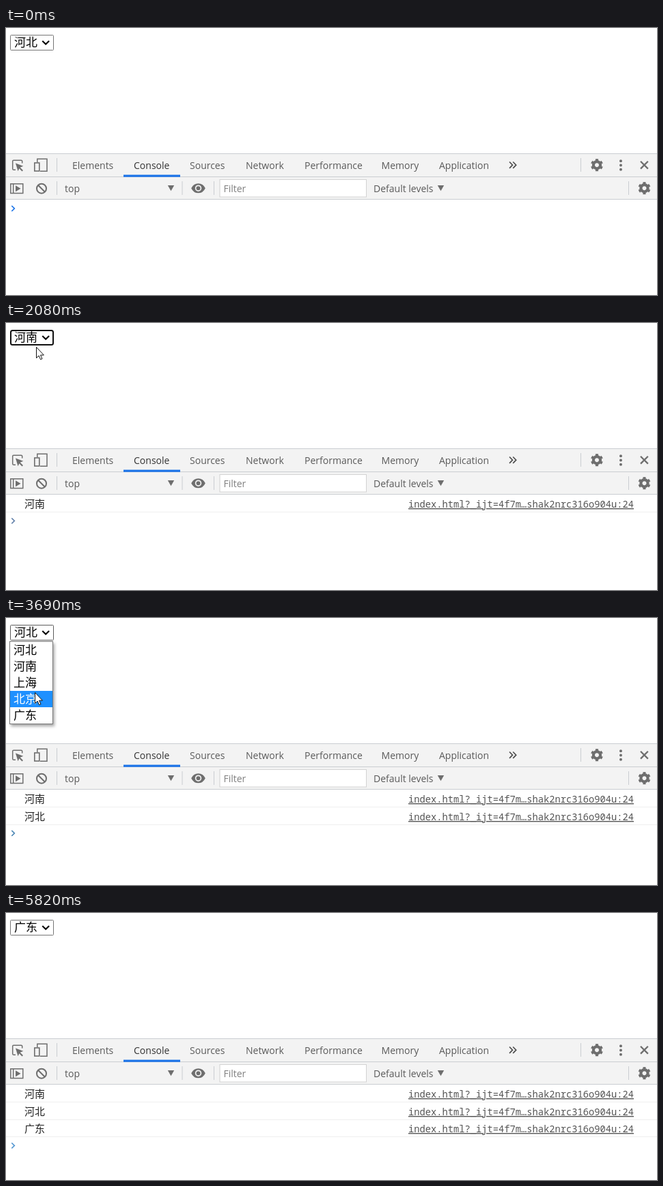
Recreate the animation shown at these times as an HTML page. Size 953 px wide and 392 px high, loop 5900 ms.

```html
<!DOCTYPE html>
<html lang="en">
<head>
<meta charset="utf-8">
<title>Select change demo</title>
<style>
  html, body { margin: 0; width: 100%; height: 100%; overflow: hidden; background: #fff; }
  svg { display: block; }
  text { white-space: pre; }
  .ui { font: 14px "Open Sans", "Noto Sans", sans-serif; fill: #5a5a5a; }
  .cjk { font: 17px "Noto Sans CJK SC", "Noto Sans CJK", sans-serif; fill: #000; }
  .log { font-size: 15px; fill: #222; }
  .link { font: 13.75px "Noto Sans Mono", "DejaVu Sans Mono", monospace; fill: #545454;
          text-anchor: end; text-decoration: underline; }
  .icon { fill: none; stroke: #6e6e6e; stroke-width: 2; }
  .solid { fill: #6e6e6e; stroke: none; }
  .rule { fill: none; stroke: #cacdd1; }
  .popup { filter: drop-shadow(2px 3px 2px rgba(0, 0, 0, .35)); }
</style>
</head>
<body>
<svg width="953" height="392" viewBox="0 0 953 392">
  <defs>
    <g id="gear" class="icon">
      <circle r="5.1" stroke-width="4.2"/>
      <circle r="7.8" stroke-width="2.6" pathLength="12" stroke-dasharray="1 1" transform="rotate(15)"/>
    </g>
    <path id="down" class="solid" d="M-4.7-4H4.7L0 4.2Z"/>
  </defs>

  <!-- Page: select box -->
  <rect id="box" fill="#fff"/>
  <text id="value" class="cjk" x="12" y="27.3"></text>
  <path d="M53.3 19l4.9 4.8 4.9-4.8" fill="none" stroke="#000" stroke-width="2.1"/>

  <!-- Developer tools: tab bar and console bar -->
  <rect y="184" width="953" height="68" fill="#f3f3f3"/>
  <path class="rule" d="M0 184.5H953M0 218.5H953M0 251.5H953M74.5 191v20M841.5 191v20M74.5 225v20M258 225v20M304.5 225v20M911.5 225v20"/>
  <rect x="172" y="215.5" width="83" height="3.2" fill="#1a73e8"/>
  <g id="tabs" class="ui"></g>

  <g class="icon">
    <path stroke-width="1.5" d="M14 208.2H11Q9.7 208.2 9.7 206.8V195.6Q9.7 194.2 11 194.2H22.2Q23.7 194.2 23.7 195.6V198.5"/>
    <path class="solid" d="M14 198.5l11.3 4.3-4.6 2 4.3 4.3-1.5 1.4-4.2-4.3-1.7 4.1z"/>
    <path stroke-width="1.5" d="M45.8 197V192.2H60V210.2H50"/>
    <rect x="41.8" y="198" width="7" height="12" stroke-width="1.6"/>
    <path stroke-width="1.7" d="M737 196.5l4.5 4.7-4.5 4.7M742.2 196.5l4.5 4.7-4.5 4.7" stroke="#505050"/>
    <path stroke-width="2.3" d="M929 195.8l10.8 10.8M939.8 195.8L929 206.6"/>
    <rect x="6.8" y="228.8" width="18" height="13.8" stroke-width="1.5"/>
    <path stroke-width="1.5" d="M10.7 229v13.5"/>
    <path class="solid" d="M14 231.2l7.5 4.5-7.5 4.5z"/>
    <circle cx="52" cy="235.7" r="7"/>
    <path d="M47 230.7l10 10"/>
  </g>
  <path class="solid" d="M271.2 235.2Q274.5 228.2 281.5 228.2T291.8 235.2Q288.5 242.3 281.5 242.3T271.2 235.2Z"/>
  <circle cx="281.5" cy="235.2" r="3.9" fill="#6e6e6e" stroke="#f3f3f3" stroke-width="1.7"/>
  <g class="solid">
    <circle cx="900" cy="195.3" r="2"/><circle cx="900" cy="201.5" r="2"/><circle cx="900" cy="207.7" r="2"/>
  </g>
  <use href="#gear" x="865" y="201.2"/>
  <use href="#gear" x="934.5" y="235.2"/>
  <use href="#down" x="241.5" y="235"/>
  <use href="#down" x="636.5" y="235"/>
  <rect x="313" y="222.5" width="214.5" height="25.5" fill="#fff" stroke="#d2d2d2"/>
  <g class="ui">
    <text x="86" y="241">top</text>
    <text x="318.5" y="241" fill="#757575" style="fill:#808080">Filter</text>
    <text x="538" y="241">Default levels</text>
  </g>

  <!-- Console output -->
  <g id="logs"></g>
  <path id="prompt" d="M8.3-4l4 4-4 4" fill="none" stroke-width="1.7"/>

  <!-- Popup list, pointer and click mark -->
  <g id="popup">
    <rect class="popup" x="5.5" y="34.5" width="63" height="121" fill="#fff" stroke="#767676"/>
    <rect id="hot" x="6" width="62" height="24" fill="#1e90ff"/>
    <g id="items" class="cjk"></g>
  </g>
  <g id="pointer">
    <path d="M.5.5V16.4L4.1 13 6.6 18.6 9 17.5 6.5 12.1H11.4Z" fill="#fff" stroke="#111" stroke-width="1"/>
    <circle id="click" r="15" fill="#ffec00" opacity=".6"/>
  </g>
</svg>

<script>
const LOOP = 5900;
const $ = id => document.getElementById(id);
const cities = ['河北', '河南', '上海', '北京', '广东'];
const tabs = { Elements: 97, Console: 187, Sources: 269, Network: 351,
               Performance: 437, Memory: 549.5, Application: 634 };
const picks = [[1700, 1], [2700, 0], [4510, 4]];
const opened = [[980, 1700], [2320, 2700], [3300, 4510]];
const clicks = [980, 1700, 2320, 2700, 3300];
const promptLook = [[265, '#1a73e8'], [290.5, '#5f7ea8'], [316, '#4a86b4'], [341.5, '#4f94d0']];

const linear = k => k;
const easeOut = k => 1 - (1 - k) ** 2;
const smooth = k => k * k * (3 - 2 * k);

// Pointer moves: start, end, positions shown, from, bend, to, easing
const moves = [
  [370, 900, 8, [811, 95], [300, 60], [47, 24], easeOut],
  [980, 1530, 8, [47, 24], [44, 44], [37, 64], smooth],
  [1700, 2230, 8, [37, 64], [40, 46], [47, 28], smooth],
  [2320, 2550, 4, [47, 28], [49, 41], [46, 51], linear],
  [3010, 3090, 2, [46, 42], [46, 38], [45, 33], linear],
  [3300, 3840, 8, [46, 30], [42, 70], [42, 116], easeOut],
  [4010, 4160, 3, [42, 122], [41, 130], [40, 138], linear],
  [4960, 5264, 5, [71, 106], [400, 0], [940, 330], linear]
];

const within = (t, [a, b]) => t >= a && t < b;

function set(el, attrs) {
  for (const name in attrs) el.setAttribute(name, attrs[name]);
  return el;
}

function add(parent, tag, attrs, text = '') {
  const el = set(document.createElementNS(parent.namespaceURI, tag), attrs);
  el.textContent = text;
  return parent.appendChild(el);
}

function show(el, on) {
  el.style.display = on ? '' : 'none';
}

function pointerAt(t) {
  const move = moves.filter(m => t >= m[0]).pop();
  if (!move) return moves[0][3];
  const [start, end, count, from, bend, to, ease] = move;
  const gap = (end - start) / (count - 1);
  const step = Math.min(count - 1, Math.floor((t - start + 6) / gap));
  const k = ease(step / (count - 1)), j = 1 - k;
  return from.map((v, i) => Math.round(j * j * v + 2 * j * k * bend[i] + k * k * to[i]));
}

for (const name in tabs) {
  const tab = add($('tabs'), 'text', { x: tabs[name], y: 207 }, name);
  if (name === 'Console') tab.style.fill = '#333';
}
const items = cities.map((city, i) => add($('items'), 'text', { x: 11, y: 53.3 + 24 * i }, city));
const rows = picks.map(([, city], i) => {
  const y = Math.round(271 + 25.5 * i);
  const row = add($('logs'), 'g', {});
  add(row, 'text', { class: 'cjk log', x: 27, y }, cities[city]);
  add(row, 'text', { class: 'link', x: 919, y }, 'index.html?_ijt=4f7m…shak2nrc316o904u:24');
  add(row, 'path', { d: `M0 ${y + 6.5}H953`, stroke: '#efefef' });
  return row;
});

function draw(now) {
  const t = now % LOOP;
  const done = picks.filter(([at]) => t >= at).length;
  const chosen = done ? picks[done - 1][1] : 0;
  const open = opened.some(span => within(t, span));
  const [x, y] = pointerAt(t);

  const ring = done > 0 && !open && t < 5820;
  set($('box'), ring
    ? { x: 7, y: 11, width: 62, height: 21, rx: 2.5, stroke: '#101010', 'stroke-width': 2 }
    : { x: 6.5, y: 10.5, width: 63, height: 22, rx: 1, stroke: open ? '#5c5c5c' : '#767676', 'stroke-width': 1 });
  $('value').textContent = cities[chosen];

  const hot = y >= 35 && y < 155 ? Math.floor((y - 35) / 24) : chosen;
  show($('popup'), open);
  set($('hot'), { y: 35 + 24 * hot });
  items.forEach((item, i) => { item.style.fill = i === hot ? '#fff' : '#000'; });

  rows.forEach((row, i) => show(row, i < done));
  const [promptY, color] = promptLook[done];
  set($('prompt'), { transform: `translate(0 ${promptY})`, stroke: color });

  show($('pointer'), within(t, [370, 5340]));
  set($('pointer'), { transform: `translate(${x} ${y})` });
  show($('click'), clicks.some(at => within(t, [at, at + 75])));
}

const begin = performance.now();
function tick() {
  draw(performance.now() - begin);
  requestAnimationFrame(tick);
}
tick();
</script>
</body>
</html>
```
